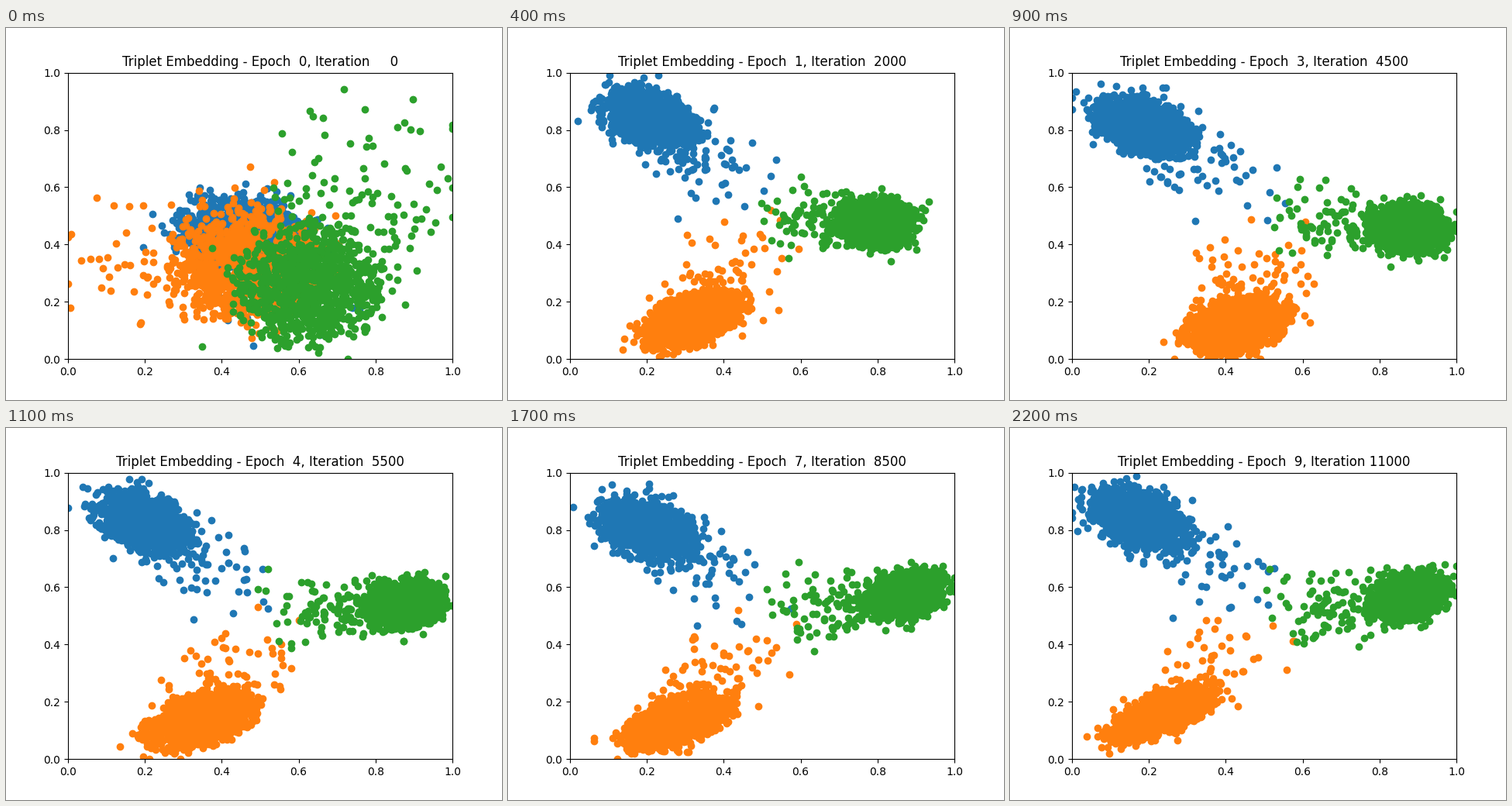
A matplotlib script for the animation above (5.2 s loop, 640 px wide and 480 px high).

```python
import numpy as np
import matplotlib.pyplot as plt
from matplotlib.animation import FuncAnimation

LAST = 22             # training snapshots after the first one
STEP_ITERS = 500
EPOCH_ITERS = 1164
FRAMES, INTERVAL = 52, 100

HUB = np.array([.5, .5])          # strays lean towards the middle
KEYS = [1, 4, 7, 9, 13, 17, 22]   # steps at which the centres turn


class Cloud:
    """Points of one class: a round core, a thin halo and a tail."""

    def __init__(self, color, n, seed, start, wide, size, pull, tail, path_x, path_y, tilt):
        self.color, self.n, self.seed = color, n, seed
        self.start = np.array(start)      # centre before training
        self.wide = np.array(wide)        # spread before training
        self.size = np.array(size)        # spread afterwards
        self.pull = np.array(pull)        # where the first tail points
        self.tail = tail                  # share of points in the tail
        self.path_x, self.path_y, self.tilt = path_x, path_y, tilt

    def points(self, step):
        mix = min(1, step / KEYS[1]) ** .2
        goal = np.array([np.interp(step, KEYS, [p[0], *p])
                         for p in (self.path_x, self.path_y)])
        centre = self.start + mix * (goal - self.start)
        size = self.wide + mix * (self.size - self.wide)
        hub = self.pull + mix * (HUB - self.pull)
        rho = mix * self.tilt(*goal)

        base = np.random.default_rng(self.seed)
        fresh = np.random.default_rng(self.seed * 100 + step)
        z = .8 * base.standard_normal((self.n, 2)) + .6 * fresh.standard_normal((self.n, 2))

        # Firm edge for the core, looser for the halo
        r = np.hypot(*z.T)
        halo = np.where(base.random(self.n) < .06, 1.5, 1)
        z *= (halo * 2.6 * np.tanh(r / 2.4) / r)[:, None]
        z[:, 1] = rho * z[:, 0] + np.sqrt(1 - rho ** 2) * z[:, 1]

        # Tail: a fan that opens from the centre towards the hub
        reach = .85 * base.random(self.n) ** 2 * (base.random(self.n) < self.tail)
        side = .45 * base.uniform(-1, 1, self.n)
        along = hub - centre
        across = np.array([-along[1], along[0]])
        fan = reach[:, None] * (along + side[:, None] * across)
        return np.clip(centre + size * z + fan, 0, 1)


CLOUDS = [
    Cloud("tab:blue", 980, 3, start=(.44, .45), wide=(.08, .06), size=(.068, .057),
          pull=(.65, .05), tail=.08,
          path_x=[.205, .235, .185, .21, .2, .17],
          path_y=[.84, .845, .815, .845, .805, .84],
          tilt=lambda x, y: -.4),
    Cloud("tab:orange", 1135, 8, start=(.47, .33), wide=(.1, .1), size=(.072, .053),
          pull=(-.05, .28), tail=.1,
          path_x=[.32, .35, .43, .265, .285, .235],
          path_y=[.14, .16, .12, .16, .135, .16],
          tilt=lambda x, y: 1.15 - 2 * x),
    Cloud("tab:green", 1032, 21, start=(.62, .26), wide=(.1, .105), size=(.054, .046),
          pull=(.95, .85), tail=.17,
          path_x=[.8, .875, .88, .865, .875, .875],
          path_y=[.475, .515, .455, .63, .575, .57],
          tilt=lambda x, y: 3 * (y - .5)),
]


def heading(step):
    it = step * STEP_ITERS
    return f"Triplet Embedding - Epoch {it // EPOCH_ITERS:2d}, Iteration {it:5d}"


fig, ax = plt.subplots(figsize=(6.4, 4.8), dpi=100)
ax.set(xlim=(0, 1), ylim=(0, 1))
title = ax.set_title(heading(0))
dots = [ax.scatter(*c.points(0).T, color=c.color) for c in CLOUDS]


def draw(frame):
    step = min(frame, LAST)
    for dot, cloud in zip(dots, CLOUDS):
        dot.set_offsets(cloud.points(step))
    title.set_text(heading(step))
    return [*dots, title]


anim = FuncAnimation(fig, draw, frames=FRAMES, interval=INTERVAL,
                     repeat=True, repeat_delay=0, blit=False)
plt.show()
```
